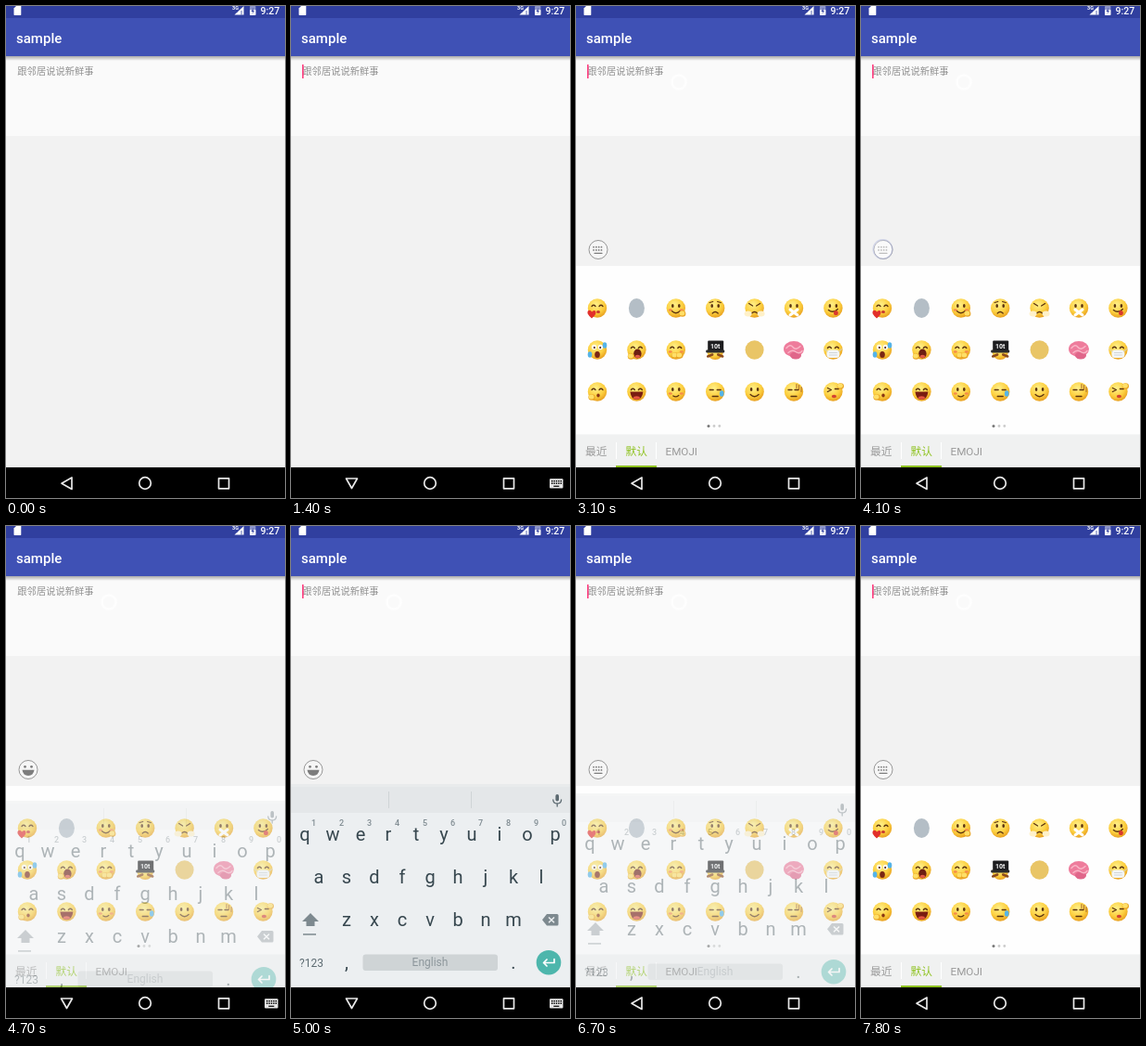
Write an HTML page that moves like this. It is 301 px wide and 530 px high and loops after 8 s.

```html
<!DOCTYPE html>
<html lang="en">
<head>
<meta charset="utf-8">
<title>Emoji keyboard</title>
<style>
html, body { margin: 0; width: 100%; height: 100%; overflow: hidden; background: #f2f2f2; }
svg { display: block; width: 100vw; height: 100vh; }
text { font-family: Roboto, "Noto Sans CJK SC", "Noto Sans CJK", sans-serif; }
.line { fill: none; stroke-linecap: round; stroke-linejoin: round; }
.key { font-size: 20px; fill: #37474f; text-anchor: middle; }
.num { font-size: 9px; font-weight: 500; fill: #7f8b91; text-anchor: middle; }
.tab { font-size: 11.7px; fill: #9a9a9a; }
</style>
</head>
<body>
<svg viewBox="0 0 301 530" xmlns="http://www.w3.org/2000/svg">
  <defs>
    <linearGradient id="shade" x2="0" y2="1">
      <stop offset="0" stop-color="#000" stop-opacity=".32"/>
      <stop offset="1" stop-color="#000" stop-opacity="0"/>
    </linearGradient>
    <radialGradient id="skin" cx=".42" cy=".32" r=".72">
      <stop offset="0" stop-color="#fff08a"/>
      <stop offset=".6" stop-color="#fccf3f"/>
      <stop offset="1" stop-color="#e69a1c"/>
    </radialGradient>
  </defs>

  <rect width="301" height="530" fill="#f2f2f2"/>
  <rect y="54" width="301" height="86" fill="#fafafa"/>
  <rect y="54" width="301" height="5" fill="url(#shade)"/>
  <rect width="301" height="54" fill="#3f51b5"/>
  <rect width="301" height="13" fill="#303f9f"/>
  <text x="11" y="40" font-size="15" font-weight="500" fill="#fff">sample</text>

  <!-- status icons -->
  <g fill="#fff">
    <path d="M11 0H16.3V9.2Q16.3 10 15.5 10H9.300Q8.500 10 8.500 9.200V2.500Z"/>
    <text x="244" y="4.300" font-size="5.500" font-weight="700">3G</text>
    <path d="M256.500 0V9.500H246.500Z"/>
    <path d="M254 5V9.500M249 5V7" stroke="#303f9f" stroke-width=".8"/>
    <rect x="263" y="0" width="6.400" height="10" rx=".8" opacity=".45"/>
    <rect x="263" y="4" width="6.400" height="6" rx=".8"/>
    <path d="M267 1.500L264.500 6H266.300L265.500 9L268 4.800H266.300Z" fill="#303f9f"/>
    <text x="274.500" y="9" font-size="10.500" font-weight="500">9:27</text>
  </g>

  <text x="12.300" y="74.300" font-size="10.300" fill="#909090">跟邻居说说新鲜事</text>
  <rect id="cursor" x="12" y="63" width="1.600" height="15" fill="#ff4081"/>
  <circle id="ghost" cx="111" cy="82" r="7.500" fill="none" stroke="#fff" stroke-width="2.500" opacity=".8"/>
  <circle id="tap" cx="111" cy="82" r="8.500" fill="#fff" stroke="#ececec"/>

  <g id="button">
    <circle cx="24" cy="262.500" r="10" fill="#f6f6f6" stroke="#8c8c8c" stroke-width=".9"/>
    <g id="smile" fill="#7d7d7d">
      <circle cx="20.500" cy="259.300" r="1.400"/><circle cx="27.500" cy="259.300" r="1.400"/>
      <path d="M17.500 262.800H30.500Q29.500 269 24 269Q18.500 269 17.500 262.800Z"/>
    </g>
    <g id="keysIcon" class="line" stroke="#7d7d7d">
      <path d="M19 259.700H30M19 262.900H30" stroke-width="1.700" stroke-dasharray=".1 2.700"/>
      <path d="M20 266.300H28" stroke-width="1.300"/>
    </g>
    <circle id="press" cx="23.500" cy="262" r="10.300" fill="#fff" stroke="#b4bbe0" stroke-width="1.500"/>
  </g>

  <g id="panel">
    <rect y="280" width="301" height="182" fill="#fefefe"/>
    <rect y="461.500" width="301" height="36" fill="#f0f1f1"/>
    <g id="faces"></g>
    <circle cx="143" cy="452.500" r="1.500" fill="#777"/>
    <circle cx="149" cy="452.500" r="1.400" fill="#ccc"/>
    <circle cx="154.800" cy="452.500" r="1.400" fill="#ccc"/>
    <path d="M43.500 470V488M86.500 470V488" stroke="#fff"/>
    <rect x="43" y="495" width="44" height="2" fill="#8ec21f"/>
    <text class="tab" x="10" y="483.500">最近</text>
    <text class="tab" x="53.500" y="483.500" style="fill:#8ec21f">默认</text>
    <text class="tab" x="96.500" y="483.500">EMOJI</text>
  </g>

  <g id="keyboard">
    <rect y="278" width="301" height="3" fill="#e9ebec"/>
    <rect y="281" width="301" height="28" fill="#e4e7e9"/>
    <rect y="309" width="301" height="240" fill="#eceff1"/>
    <path d="M105.500 286V304M194.500 286V304" stroke="#cfd4d6"/>
    <g class="line" stroke="#5c6a71" stroke-width="1.300">
      <rect x="285.400" y="289" width="3.600" height="7.600" rx="1.800" fill="#5c6a71" stroke="none"/>
      <path d="M282.800 295Q283 299 287.200 299Q291.400 299 291.600 295M287.200 299V302"/>
    </g>
    <g id="keys"></g>
    <path d="M21 417L30 426H25.500V431H16.500V426H12Z" fill="#7d898f"/>
    <rect x="13" y="439" width="14" height="1.800" fill="#8f9a9f"/>
    <path d="M276 418H287Q288.500 418 288.500 419.500V429Q288.500 430.500 287 430.500H276L271 424.200Z" fill="#7d898f"/>
    <path d="M278 421.500L284 427.200M284 421.500L278 427.200" stroke="#eceff1" stroke-width="1.500"/>
    <text x="22" y="474.500" font-size="12" fill="#5c6a71" text-anchor="middle">?123</text>
    <rect x="77.500" y="461.500" width="145.500" height="17.500" rx="3" fill="#cfd4d6"/>
    <text x="150" y="474.300" font-size="12" fill="#8d979c" text-anchor="middle">English</text>
    <circle cx="278" cy="470.200" r="13.300" fill="#4db6ac"/>
    <path class="line" d="M284 466.500V470.500H272.500M276 467L272.500 470.500L276 474" stroke="#fff" stroke-width="1.700"/>
  </g>

  <rect y="497" width="301" height="33" fill="#000"/>
  <g class="line" stroke="#e8e8e8" stroke-width="1.700">
    <path id="back" d="M71 508V520.500L60 514.200Z"/>
    <path id="down" d="M59.500 509H71.500L65.500 519.500Z"/>
    <circle cx="150" cy="514" r="6.300"/>
    <rect x="229.500" y="508.800" width="11" height="11"/>
  </g>
  <g id="ime">
    <rect x="279" y="509.300" width="14.500" height="10.200" rx="1" fill="#e8e8e8"/>
    <path d="M281 511.800H292M281 514.300H292" stroke="#000" stroke-width="1.400" stroke-dasharray="1.400 1"/>
    <path d="M283.300 517.300H289.300" stroke="#000" stroke-width="1.200"/>
  </g>
</svg>

<script>
const LOOP = 8000;
const $ = id => document.getElementById(id);

// keyboard letters
function row(letters, x, y) {
  return [...letters].map((c, i) =>
    `<text class="key" x="${x + i * 30}" y="${y}">${c}</text>`).join('');
}
const digits = [...'1234567890'].map((c, i) =>
  `<text class="num" x="${24.500 + i * 30}" y="322.500">${c}</text>`).join('');
$('keys').innerHTML = row('qwertyuiop', 15, 339) + digits +
  row('asdfghjkl', 30, 385) + row('zxcvbnm', 60, 431) +
  row(',', 60, 477) + row('.', 240, 477);

// emoji parts, drawn around 0,0
const INK = '#5a3210';
const line = (d, color = INK, w = 1.3) =>
  `<path class="line" d="${d}" stroke="${color}" stroke-width="${w}"/>`;
const blob = (x, y, rx, ry, color) =>
  `<ellipse cx="${x}" cy="${y}" rx="${rx}" ry="${ry}" fill="${color}"/>`;
const head = blob(0, 0, 10.2, 10.2, 'url(#skin)');
const dots = blob(-3.5, -2.5, 1.3, 1.9, INK) + blob(3.5, -2.5, 1.3, 1.9, INK);
const shut = line('M-6 -2Q-4 -4.500 -2 -2M2 -2Q4 -4.500 6 -2');
const wide = blob(-3.5, -3, 2.6, 2.8, '#fff') + blob(3.5, -3, 2.6, 2.8, '#fff') +
  blob(-3.2, -2.6, 1, 1.2, INK) + blob(3.2, -2.6, 1, 1.2, INK);
const grin = line('M-4.500 3Q0 7.500 4.500 3');
const sad = line('M-3 5.500Q0 2.500 3 5.500');
const blush = blob(-6, 2, 2, 1.3, '#f58a4a') + blob(6, 2, 2, 1.3, '#f58a4a');
const drop = (x, y) => blob(x, y, 2.3, 3.3, '#55b4e8');
const hand = (x, y) => blob(x, y, 3.6, 3.2, '#e9a424') + blob(x - .4, y - .6, 2.9, 2.5, '#ffdf68');

const faces = [
  head + shut + blob(1, 4, 2, 1.5, '#c8372d') +
    '<path d="M-6 11Q-13 5 -9.500 2.500Q-7 1.500 -6 4Q-4 1.500 -2 3Q0 6 -6 11Z" fill="#e2302c"/>',
  blob(0, 0, 8.5, 10.5, '#b4bec6'),
  head + dots + grin + blush + hand(7, 6),
  head + dots + sad + line('M-6 -6L-2.500 -7M2.500 -7L6 -6'),
  head + line('M-6 -5L-2 -2.500M6 -5L2 -2.500') + sad +
    blob(-7, 6, 4, 3, '#fff1c9') + blob(7, 6, 4, 3, '#fff1c9'),
  head + dots + line('M-4 1.500L4 7.500M4 1.500L-4 7.500', '#fff', 3),
  head + dots + line('M-5 2Q0 6 5 1') + blob(3, 5, 2.4, 2.6, '#d8382e'),
  head + wide + blob(0, 5, 2.8, 3.5, '#7b2613') + drop(-8, 5) + drop(8, -5),
  head + shut + blob(1, 4, 4.2, 5, '#6d1f12') + blob(1, 7, 2.8, 1.8, '#e05a45') + hand(-6, 7),
  head + shut + blush + hand(-1, 6) + hand(4, 6),
  blob(0, 3, 8.5, 7.5, 'url(#skin)') + line('M-8 7L-3 5M8 7L3 5', '#8b4a1e', 2.5) +
    '<rect x="-8" y="-10" width="17" height="11" rx="1" fill="#1d1d1f"/>' +
    '<rect x="-10" y="0" width="20" height="3" rx="1" fill="#2b2b2d"/>' +
    '<text y="-2" font-size="7" font-weight="700" fill="#fff" text-anchor="middle">10t</text>',
  blob(0, 0, 10, 10.2, '#e9c566'),
  blob(0, -1, 11, 8.5, '#ee7c9c') + blob(2, 6, 6, 4, '#e0668a') +
    line('M-8 -2Q-4 -7 -1 -3T7 -4M-6 3Q-2 -1 2 2T9 1', '#f9b5c6', 1.5),
  head + shut + '<rect x="-7" y="0" width="14" height="8.500" rx="3.500" fill="#f4f6f7"/>' +
    line('M-9.500 -1L-6 2M9.500 -1L6 2M-4 3H4M-4 5.500H4', '#cdd3d6', .9),
  head + shut + blob(1, 4, 1.7, 1.9, '#8a3514') + hand(-6, 6),
  head + shut + '<path d="M-7 0H7Q6 8.500 0 8.500Q-6 8.500 -7 0Z" fill="#7a1d12"/>' +
    blob(0, 6.5, 3.5, 1.7, '#e5553f'),
  head + dots + blush + line('M-3 4.500Q0 6.500 3 4'),
  head + line('M-6 -2H-2M2 -2H6') + line('M-3 5H3') + drop(7, 2),
  head + dots + grin,
  head + line('M-6 -2H-2M1 -2H5M-3 5H3') + line('M3 -8V-4M5.500 -7V-2M8 -5V0', '#a8672a', 1),
  head + line('M-6 -4L-2 -2L-6 0M6 -3H2') + blob(1, 5, 2.6, 1.7, '#d44332') + hand(8, -6)
];
$('faces').innerHTML = faces.map((art, i) => {
  const x = 23 + (i % 7) * 42.4, y = 325.5 + Math.floor(i / 7) * 45;
  return `<g transform="translate(${x} ${y})">${art}</g>`;
}).join('');

// step timelines: [ms, value] pairs
function play(id, prop, steps, wrap = v => v) {
  const frames = steps.map(([t, v]) =>
    ({ offset: t / LOOP, [prop]: wrap(v), easing: 'steps(1, end)' }));
  frames.push({ offset: 1, [prop]: wrap(steps[steps.length - 1][1]) });
  $(id).animate(frames, { duration: LOOP, iterations: Infinity });
}
const fade = (id, steps) => play(id, 'opacity', steps);
const toggle = (id, first, times) =>
  fade(id, [[0, first], ...times.map((t, i) => [t, i % 2 ? first : 1 - first])]);

toggle('cursor', 0, [200, 700, 1100, 2100, 2600, 3600, 4100, 4600, 5000, 5500,
  5900, 6400, 6600, 7300, 7800]);
toggle('tap', 0, [1000, 1300]);
fade('ghost', [[0, 0], [1500, .8]]);
toggle('button', 0, [1500]);
toggle('smile', 1, [2800, 4500, 6600]);
toggle('keysIcon', 0, [2800, 4500, 6600]);
fade('press', [[0, 0], [2500, .15], [2600, .5], [2800, 0], [4100, .5], [4500, 0],
  [6200, .5], [6600, 0]]);
toggle('panel', 0, [2800]);
toggle('ime', 0, [1300, 2800, 4600, 6600]);
toggle('down', 0, [1300, 2800, 4600, 6600]);
toggle('back', 1, [1300, 2800, 4600, 6600]);
fade('keyboard', [[0, 0], [1500, .6], [1600, 1], [2800, .94], [2900, .55], [3000, .2],
  [3100, 0], [4700, .4], [4800, .8], [4900, 1], [6600, .94], [6700, .4], [6800, 0]]);
play('keyboard', 'transform', [[0, 0], [1500, 12], [1600, 0], [2900, 6], [3000, 16],
  [4700, 18], [4800, 6], [4900, 0], [6700, 10]], y => `translate(0px, ${y}px)`);
</script>
</body>
</html>
```
